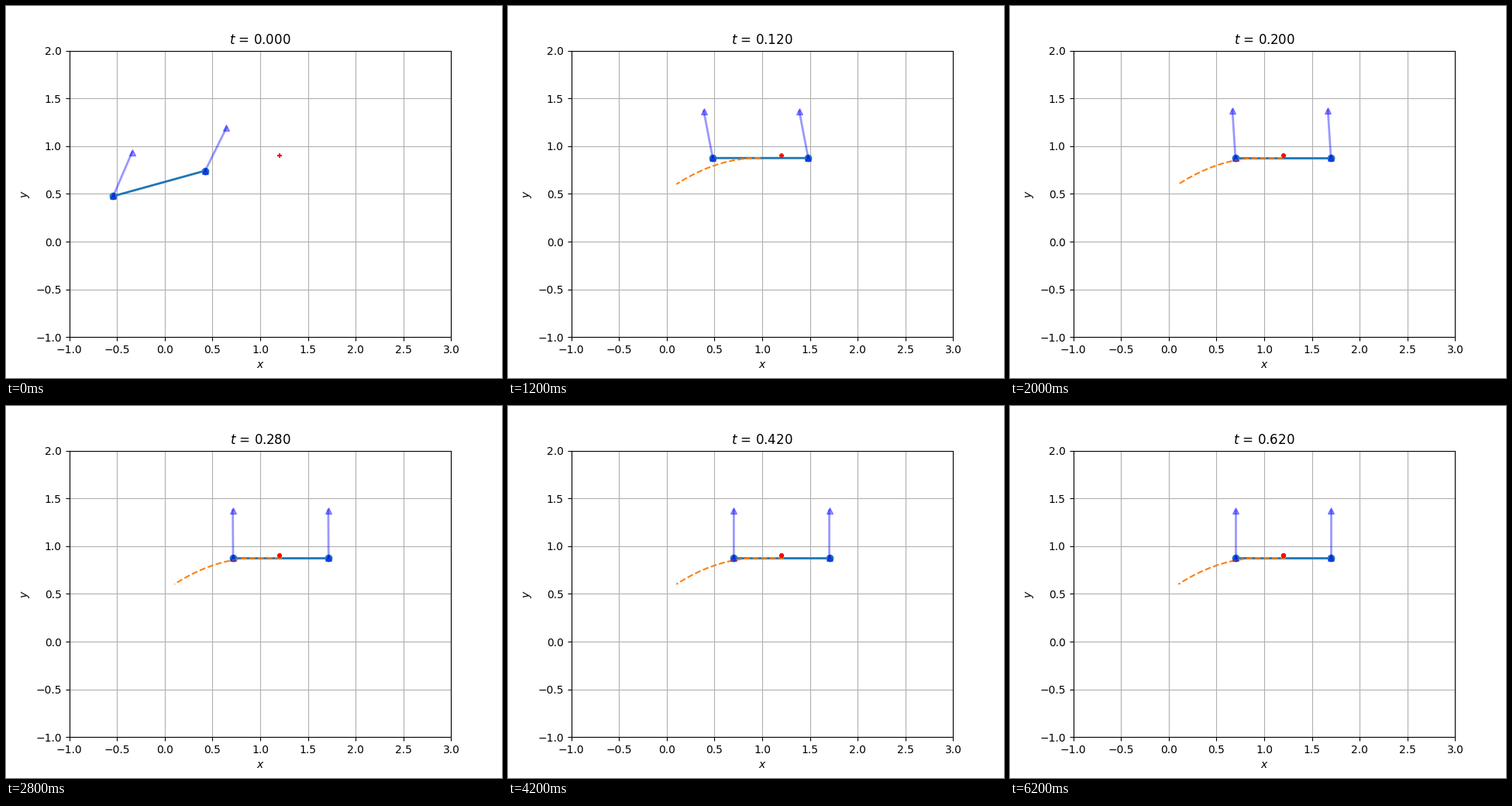
Recreate the animation shown at these times as a matplotlib script. Size 640 by 480 pixels, loop 6300 ms.

```python
import numpy as np
import matplotlib.pyplot as plt
from matplotlib.animation import FuncAnimation

FRAMES = 63
INTERVAL = 100  # ms
DT = 0.01
HALF = 0.5      # half the beam length
THRUST = 0.5    # arrow length
TARGET = (1.2, 0.9)

n = np.arange(FRAMES)

# The beam closes in on x = 1.2, overshoots slightly and drifts back.
approach = 1.1 * np.exp(-0.0284 * n - 0.0085 * n ** 2)
overshoot = 0.02 * np.exp(-((n - 22) / 14) ** 2)
path_x = TARGET[0] - approach + overshoot

# It climbs along a parabola and then stays level.
path_y = 0.875 - 0.275 * np.clip((0.95 - path_x) / 0.85, 0, None) ** 2

# Beam angle, and thrust angle from vertical: forward first, then braking.
tilt = 0.27 * np.exp(-0.7 * n)
lean = 0.405 * (n / 5.15 - 1) * np.exp(-(n / 11.7) ** 2)

fig, ax = plt.subplots(figsize=(6.4, 4.8), dpi=100)
ax.set_xlim(-1, 3)
ax.set_ylim(-1, 2)
ax.set_aspect("equal")
ax.grid()
ax.set_xlabel("$x$")
ax.set_ylabel("$y$")
title = ax.set_title("")

beam, = ax.plot([], [], "o-", lw=2)
trail, = ax.plot([], [], "--")
arrows = [ax.plot([], [], "b^-", lw=2, alpha=0.4)[0] for _ in range(2)]
goal, = ax.plot([], [], "r+", ms=20 ** 0.5, mew=1.5)


def update(i):
    cx = path_x[i] - 0.59 * tilt[i]
    cy = path_y[i] + 0.03 * tilt[i]
    dx, dy = HALF * np.cos(tilt[i]), HALF * np.sin(tilt[i])
    ends = [(cx - dx, cy - dy), (cx + dx, cy + dy)]
    beam.set_data(*zip(*ends))

    # Newest point first, so the dashes start at the beam.
    trail.set_data(path_x[i::-1], path_y[i::-1])

    angles = (lean[i], lean[i] - 0.2 * tilt[i])
    for arrow, (x, y), a in zip(arrows, ends, angles):
        arrow.set_data([x, x - THRUST * np.sin(a)], [y, y + THRUST * np.cos(a)])

    # The goal is stamped once more each step, so its soft edges fill in.
    goal.set_data([TARGET[0]] * (i + 1), [TARGET[1]] * (i + 1))
    title.set_text(f"$t$ = {i * DT:.3f}")
    return [beam, trail, *arrows, goal, title]


anim = FuncAnimation(fig, update, frames=FRAMES, interval=INTERVAL,
                     repeat=True, repeat_delay=0)
plt.show()
```
